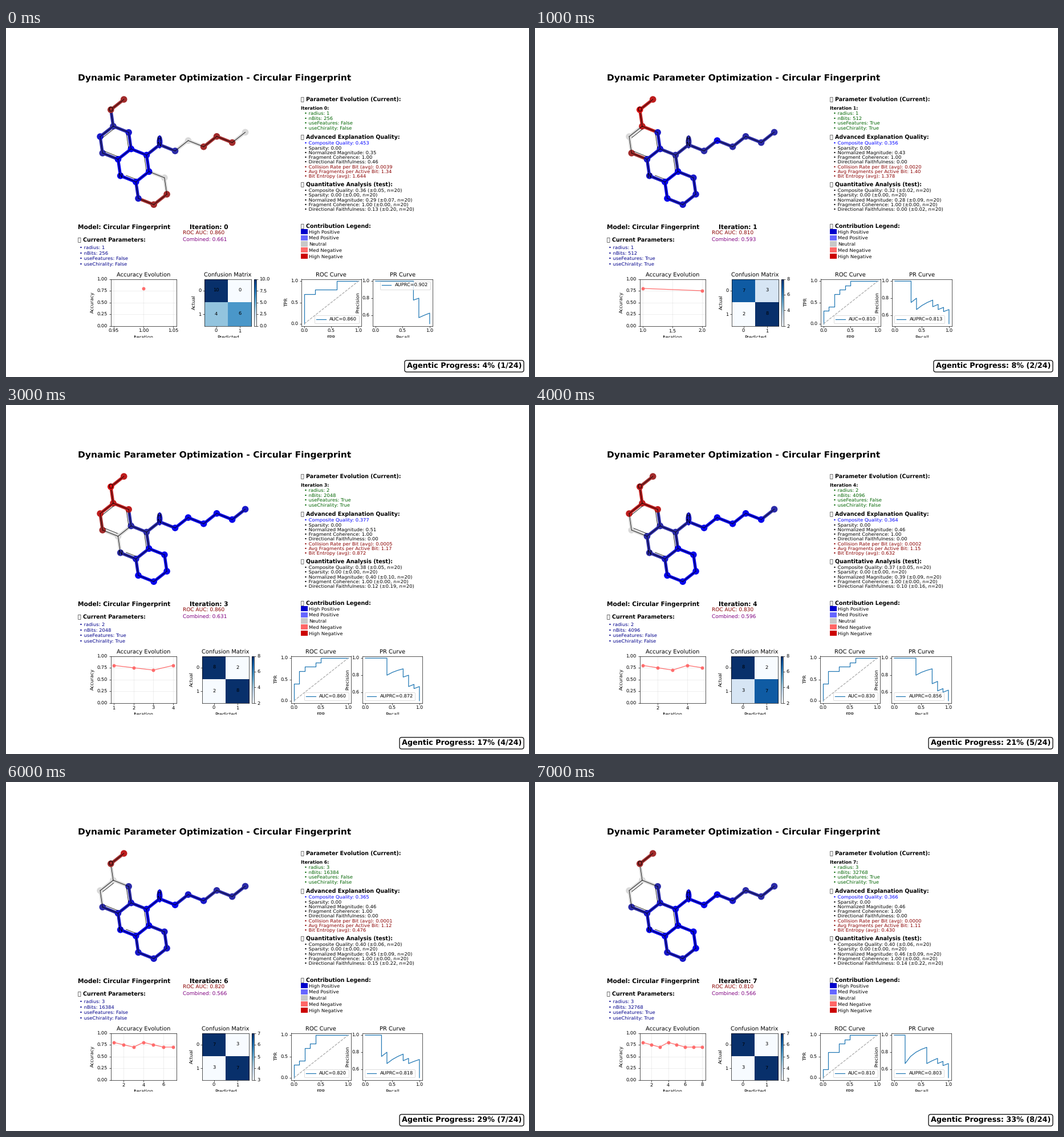
A matplotlib script that plays this animation: 917 by 611 pixels, repeating every 8 s.

```python
from itertools import combinations

import numpy as np
import matplotlib.pyplot as plt
from matplotlib.animation import FuncAnimation
from matplotlib.patches import Circle, Ellipse, Rectangle
from matplotlib.ticker import MaxNLocator

W, H, DPI = 917, 611, 72  # at 72 dpi one point is one pixel
K = 0.82                  # scale of the default chart style
TOTAL = 24
TOFU = "\U0001F4CA "      # has no glyph, shows as an empty box

plt.rcParams.update({
    "font.family": "DejaVu Sans", "font.size": 10 * K, "text.hinting": "none",
    "axes.titlesize": 12 * K, "axes.titlepad": 6 * K, "axes.labelpad": 4 * K,
    "axes.linewidth": 0.8 * K, "grid.linewidth": 0.8 * K,
    "lines.linewidth": 1.5 * K, "lines.markersize": 6 * K,
    "patch.linewidth": K,
    "xtick.major.size": 3.5 * K, "ytick.major.size": 3.5 * K,
    "xtick.major.pad": 3.5 * K, "ytick.major.pad": 3.5 * K,
    "xtick.major.width": 0.8 * K, "ytick.major.width": 0.8 * K,
})

# true classes ranked by score; the bar marks the decision threshold
RANKING = [
    "PPPPPP|PNNPNNNNPPNNNN", "PPPNPNPPPNP|NPNPNNNNN",
    "PPPPNP|NPNPNNNNPPNNPN", "PPPPNPPPNP|NNPNPNNNNN",
    "PPPPNPPPN|NPNNPNPNNNN", "PPPPNPNPPN|PNPPNNNNNN",
    "PPPNPNPPPN|PNPPNNNNNN", "PPNPPPPNNP|PNPNPNNNNN",
]

# atom contributions, from strong negative (z) to strong positive (c)
LEVELS = "zyx0abc"
CONTRIB = [
    "abaccbccccba0xxx00xxbxx", "y0xbbbbccaaacaaaabbbczy",
    "zyyy0y0ccaacccccbcccczy", "yyx0ayabcabcccccbcccczy",
    "yy0aayabcabcccccaccccyx", "00abbaccccccbbbaabbbbx0",
    "00abbaccccccbbaaabbbbxy", "00abbacccccccbaaaccbbxx",
]
N, NH, O = 6, 10, 21
RINGS = ([0, 1, 2, 3, 4, 5], [3, 4, 6, 7, 8, 9])
DOUBLE = {(0, 1): 0, (2, 3): 0, (4, 5): 0, (6, 7): 1, (8, 9): 1}


def build_molecule():
    """Walk a tilted hexagonal lattice; digits are directions in 60° turns."""
    atoms = [np.array([187.5, 171.5])]
    for start, path in ((0, "45012"), (3, "5012"), (9, "1010101"),
                        (8, "0543"), (0, "21")):
        pos = atoms[start]
        for k in path:
            angle = np.radians(21.7 - 60 * int(k))
            pos = pos + 29.2 * np.array([np.cos(angle), np.sin(angle)])
            atoms.append(pos)
    atoms = np.array(atoms)
    bonds = [(a, b) for a, b in combinations(range(len(atoms)), 2)
             if np.hypot(*(atoms[a] - atoms[b])) < 30]
    return atoms, bonds


ATOMS, BONDS = build_molecule()

fig = plt.figure(figsize=(W / DPI, H / DPI), dpi=DPI, facecolor="white")


def shade(level):
    if level == 0:
        return (0.85, 0.85, 0.85)
    dull, pure = (((.17, .17, .66), (.02, .02, .92)) if level > 0 else
                  ((.63, .17, .17), (.86, .06, .06)))
    t = (abs(level) - 1) / 2
    return tuple((1 - t) * np.array(dull) + t * np.array(pure))


def keyed(i, points):
    return np.interp(i, list(points), list(points.values()))


def ranking_stats(i):
    cut = RANKING[i].index("|")
    hits = np.array([c == "P" for c in RANKING[i].replace("|", "")])
    tp, fp = np.cumsum(hits), np.cumsum(~hits)
    precision = tp / (tp + fp)
    matrix = np.array([[10 - fp[cut - 1], fp[cut - 1]],
                       [10 - tp[cut - 1], tp[cut - 1]]])
    return dict(tpr=np.r_[0, tp] / 10, fpr=np.r_[0, fp] / 10,
                precision=np.r_[1, precision], matrix=matrix,
                accuracy=np.trace(matrix) / 20, auc=tp[~hits].sum() / 100,
                # the tiny offset makes exact halves round down
                ap=precision[hits].sum() / 10 - 1e-9)


STATS = [ranking_stats(i) for i in range(len(RANKING))]


def text(x, y, s, size=8.35, color="black", bold=False, **kw):
    return fig.text(x / W, 1 - y / H, s, fontsize=size, color=color,
                    weight="bold" if bold else "normal", **kw)


def bullets(x, y, step, lines, colors):
    for j, line in enumerate(lines):
        color = colors if isinstance(colors, str) else colors[j]
        text(x, y + step * j, "• " + line, color=color)


def chart(left, width, title="", xlabel="", ylabel=""):
    ax = fig.add_axes([left / W, 1 - 521.5 / H, width / W, 82 / H])
    ax.set(title=title, xlabel=xlabel, ylabel=ylabel)
    return ax


def overhang(ax):
    """How far labels reach past the right side of a chart, in pixels."""
    return (ax.get_tightbbox().x1 - ax.bbox.x1) * W / fig.bbox.width


def canvas():
    ax = fig.add_axes([0, 0, 1, 1])
    ax.set(xlim=(-0.5, W - 0.5), ylim=(H - 0.5, -0.5))
    ax.axis("off")
    return ax


def draw_molecule(ax, codes):
    levels = [LEVELS.index(c) - 3 for c in codes]
    for a, b in BONDS:
        weaker = min(levels[a], levels[b], key=abs)
        ax.plot(*zip(ATOMS[a], ATOMS[b]), color=shade(weaker), lw=5.4,
                solid_capstyle="butt", zorder=1)
    for j, (x, y) in enumerate(ATOMS):
        dot = Ellipse((x, y - 5), 10, 23) if j == NH else Circle((x, y), 5.8)
        dot.set(facecolor=shade(levels[j]), edgecolor="none", zorder=2)
        ax.add_patch(dot)

    for a, b in BONDS:
        p, q = ATOMS[a], ATOMS[b]
        d = (q - p) / np.hypot(*(q - p))
        p = p + d * 6 * (a in (O, N, NH))
        q = q - d * 6 * (b in (O, N, NH))
        ax.plot(*zip(p, q), color="black", lw=0.8, zorder=3)
        if (a, b) in DOUBLE:
            center = ATOMS[RINGS[DOUBLE[a, b]]].mean(axis=0)
            n = np.array([-d[1], d[0]])
            n *= 4.3 * np.sign(n @ (center - p))
            ax.plot(*zip(p + n + 3 * d, q + n - 3 * d),
                    color="black", lw=0.8, zorder=3)
    x, y = ATOMS[NH]
    for pos, s in ((ATOMS[O], "O"), (ATOMS[N], "N"),
                   ((x, y), "N"), ((x, y - 9), "H")):
        ax.text(*pos, s, size=10.5, ha="center", va="center", zorder=4)


def draw_quality(i):
    mag = keyed(i, {0: .352, 1: .4255, 2: .563, 4: .456, 7: .464})
    faith = {0: .46, 2: .4715, 5: .877}.get(i, 0)
    comp = (mag + 1 + faith) / 4
    combined = 0.6 * STATS[i]["accuracy"] + 0.4 * comp
    fragments = keyed(i, {0: 1.34, 1: 1.40, 2: 1.20, 5: 1.12, 7: 1.11})
    entropy = keyed(i, {0: 1.644, 2: 1.112, 4: .632, 5: .522, 7: .430})

    text(310.3, 361.3, f"ROC AUC: {STATS[i]['auc']:.3f}", 9.0, "darkred")
    text(310.3, 373.3, f"Combined: {combined:.3f}", 9.0, "purple")
    bullets(522.6, 203.6, 8.28, [
        f"Composite Quality: {comp:.3f}", "Sparsity: 0.00",
        f"Normalized Magnitude: {mag:.2f}", "Fragment Coherence: 1.00",
        f"Directional Faithfulness: {faith:.2f}",
        f"Collision Rate per Bit (avg): {1 / (256 << i):.4f}",
        f"Avg Fragments per Active Bit: {fragments:.2f}",
        f"Bit Entropy (avg): {entropy:.3f}",
    ], ["blue"] + ["black"] * 4 + ["darkred"] * 3)

    mag = keyed(i, {0: .292, 1: .28, 2: .41, 4: .39, 5: .44, 7: .46})
    faith = keyed(i, {0: .13, 1: 0, 2: .15, 4: .10, 5: .15, 7: .14})
    mag_sd = keyed(i, {0: .07, 2: .11, 4: .09})
    faith_sd = 0.02 + 1.4 * faith
    rows = [("Composite Quality", (mag + 1 + faith) / 4,
             np.hypot(mag_sd, faith_sd) / 4),
            ("Sparsity", 0, 0), ("Normalized Magnitude", mag, mag_sd),
            ("Fragment Coherence", 1, 0),
            ("Directional Faithfulness", faith, faith_sd)]
    bullets(522.6, 286.2, 8.35, [f"{name}: {mean:.2f} (±{sd:.2f}, n=20)"
                                 for name, mean, sd in rows], "black")


def draw_texts(ax, i):
    params = [f"radius: {1 + (i + 1) // 3}", f"nBits: {256 << i}",
              f"useFeatures: {i % 2 == 1}", f"useChirality: {i % 2 == 1}"]

    text(126.4, 92.2, "Dynamic Parameter Optimization - Circular Fingerprint",
         15.45, bold=True)
    text(126.2, 351.4, "Model: Circular Fingerprint", 10.68, bold=True)
    text(322, 351.4, f"Iteration: {i}", 10.68, bold=True)
    for x, y, s in ((516.8, 128.2, "Parameter Evolution (Current):"),
                    (516.8, 193.9, "Advanced Explanation Quality:"),
                    (516.8, 276.7, "Quantitative Analysis (test):"),
                    (516.8, 350.2, "Contribution Legend:"),
                    (126.2, 373.9, "Current Parameters:")):
        text(x, y, TOFU + s, 9.5, bold=True)
    text(516.8, 143, f"Iteration {i}:", 7.8, bold=True)
    bullets(129.1, 387, 9.45, params, "darkblue")
    bullets(522.6, 152.3, 8.28, params, "darkgreen")

    legend = (("High Positive", "#0000cc"), ("Med Positive", "#6666ff"),
              ("Neutral", "#c8c8c8"), ("Med Negative", "#ff6666"),
              ("High Negative", "#cc0000"))
    for j, (name, color) in enumerate(legend):
        y = 356.2 + 10.65 * j
        ax.add_patch(Rectangle((516.6, y - 4.6), 11.4, 9.2, fc=color,
                               ec="none"))
        text(530.9, y + 3.4, name)


def draw_charts(i):
    stats = STATS[i]

    ax = chart(183.5, 115, "Accuracy Evolution", "Iteration", "Accuracy")
    ax.plot(range(1, i + 2), [s["accuracy"] for s in STATS[:i + 1]], "o-",
            color="#ff6b6b")
    ax.set(ylim=(0, 1), yticks=[0, .25, .5, .75, 1])
    ax.grid(alpha=0.3)

    # wide tick labels push the charts after them to the right
    shift = round(overhang(ax))
    left = 344 + shift
    ax = chart(left, 82.3, "Confusion Matrix", "Predicted", "Actual")
    image = ax.imshow(stats["matrix"], cmap="Blues", aspect="auto")
    ax.set(xticks=[0, 1], yticks=[0, 1])
    for (r, c), v in np.ndenumerate(stats["matrix"]):
        ax.text(c, r, str(v), ha="center", va="center")
    bar = chart(left + 86.5, 4.3)
    fig.colorbar(image, cax=bar,
                 ticks=MaxNLocator(4, steps=[1, 2, 2.5, 5, 10]))
    shift += round(overhang(bar) - 10.6)

    ax = chart(500.2 + shift, 104.4, "ROC Curve", "FPR", "TPR")
    ax.plot(stats["fpr"], stats["tpr"], label=f"AUC={stats['auc']:.3f}")
    ax.plot([0, 1], [0, 1], "--", color="#aaaaaa")
    ax.set(xticks=[0, .5, 1], yticks=[0, .5, 1])
    ax.legend(loc="lower right")

    ax = chart(625.2 + shift, 104.4, "PR Curve", "Recall", "Precision")
    ax.plot(stats["tpr"], stats["precision"], label=f"AUPRC={stats['ap']:.3f}")
    ax.set(xticks=[0, .5, 1], yticks=[.6, .8, 1], ylim=(.475, 1.025))
    ax.legend(loc="best")


def draw(i):
    fig.clear()
    ax = canvas()
    draw_molecule(ax, CONTRIB[i])
    draw_texts(ax, i)
    draw_quality(i)
    draw_charts(i)
    # the panel ends here and cuts the axis labels
    fig.add_artist(Rectangle((0, 0), 1, 1 - 542 / H, fc="white", ec="none",
                             zorder=4))
    n = i + 1
    text(904.1, 598.4, f"Agentic Progress: {100 * n / TOTAL:.0f}% ({n}/{TOTAL})",
         12.74, bold=True, ha="right", va="bottom", zorder=5,
         bbox=dict(boxstyle="round,pad=0.3", fc="white", ec="black", lw=1.27))
    return []


anim = FuncAnimation(fig, draw, frames=len(RANKING), interval=1000,
                     repeat=True, init_func=lambda: [], blit=False)
plt.show()
```
